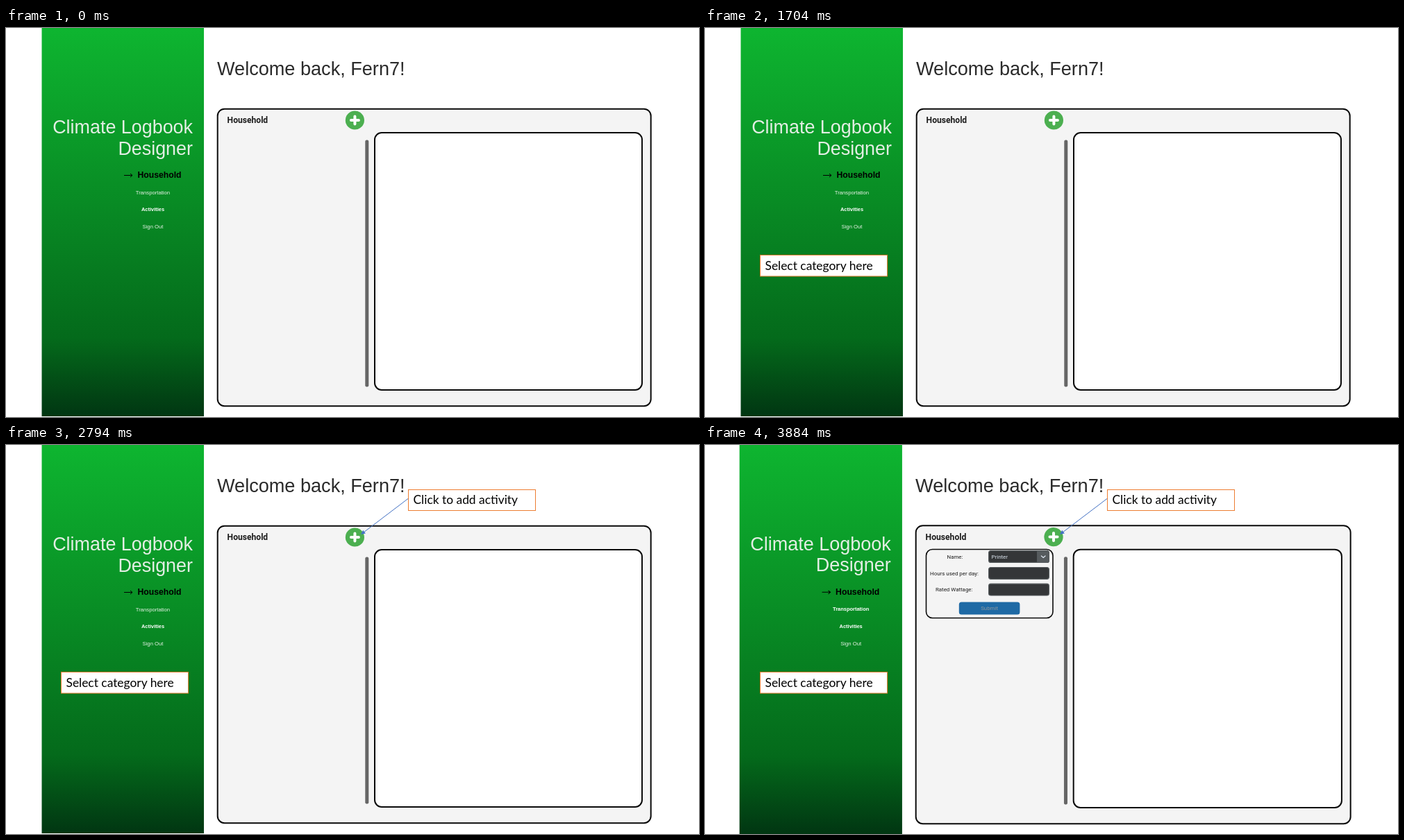
These frames come from a looping animation (998 by 561 pixels, 4.32 s). An HTML page:

```html
<!DOCTYPE html>
<html lang="en">
<head>
<meta charset="utf-8">
<title>Household dashboard</title>
<style>
  html, body { margin: 0; width: 100%; height: 100%; overflow: hidden; background: #fff; }
  svg { display: block; width: 100vw; height: 100vh; }
  text { font-family: "Liberation Sans", Arial, sans-serif; }
  .title { font-size: 26.9px; fill: #e3eee4; text-anchor: end; }
  .menu { font-size: 7.7px; fill: #e6f2e6; text-anchor: middle; }
  .bold { font-size: 7.45px; font-weight: 700; fill: #fff; }
  .note text { font: 17.4px Lato, sans-serif; }
  .note rect { fill: #fff; stroke: #ed7d31; }
  .panel { stroke: #0a0a0a; stroke-width: 2; }
  .form text, .head { font: 7.9px Roboto, sans-serif; fill: #1c1c1c; }
  .head { font-size: 12.1px; font-weight: 700; }
  .mid { text-anchor: middle; }
  .field { fill: #343638; stroke: #565b5e; stroke-width: 1.2; }
</style>
</head>
<body>
<svg viewBox="0 0 998 561" preserveAspectRatio="none">
  <defs>
    <linearGradient id="green" x1="0" y1="0" x2="0" y2="1">
      <stop offset="0" stop-color="#0eb530"/>
      <stop offset=".8" stop-color="#046a1b"/>
      <stop offset="1" stop-color="#013612"/>
    </linearGradient>
  </defs>

  <g id="app">
    <rect x="51.5" width="233.5" y="0" height="560" fill="url(#green)"/>
    <text class="title" x="269" y="152">Climate Logbook</text>
    <text class="title" x="269" y="182.5">Designer</text>
    <path d="M170 212.5h12m-3-2.5 3 2.5-3 2.5" fill="none" stroke="#000"/>
    <text x="189.5" y="216" font-size="12.2" font-weight="700">Household</text>
    <text id="transport" class="menu" x="211.5" y="239.5">Transportation</text>
    <text class="menu bold" x="211.5" y="264">Activities</text>
    <text class="menu" x="211.5" y="289">Sign Out</text>

    <text x="304" y="68.3" font-size="27.1" fill="#2b2b2b">Welcome back, Fern7!</text>
    <rect class="panel" x="304.7" y="116.7" width="624" height="428.5" rx="10" fill="#f4f4f4"/>
    <text class="head" x="318.6" y="137.2">Household</text>
    <circle cx="502.4" cy="133" r="13.6" fill="#4caf50"/>
    <path d="M496.9 133h11m-5.5-5.5v11" stroke="#fff" stroke-width="4" stroke-linecap="round"/>
    <rect x="517.3" y="161.5" width="5" height="356" rx="2.2" fill="#666"/>
    <rect class="panel" x="531" y="151" width="385" height="371" rx="10" fill="#fff"/>
  </g>

  <g id="form" class="form">
    <rect class="panel" x="318.5" y="150.5" width="182.5" height="99" rx="9" fill="#f4f4f4" style="stroke-width:1.6"/>
    <text class="mid" x="360" y="163.7">Name:</text>
    <text class="mid" x="359" y="187.5">Hours used per day:</text>
    <text class="mid" x="358.7" y="211.2">Rated Wattage:</text>
    <rect class="field" x="408.6" y="152.6" width="86.8" height="16.8" rx="3"/>
    <path d="M478 152h14.4q3.6 0 3.6 3.6v10.8q0 3.6-3.6 3.6H478z" fill="#565b5e"/>
    <path d="m484.4 160 2.8 2.4 2.8-2.4" fill="none" stroke="#dce4ee" stroke-width="1.3" stroke-linecap="round"/>
    <text x="412.6" y="163.7" style="fill:#dce4ee">Printer</text>
    <rect class="field" x="408.6" y="176.5" width="86.8" height="16.8" rx="3"/>
    <rect class="field" x="408.6" y="200.2" width="86.8" height="16.8" rx="3"/>
    <rect x="365.8" y="226.5" width="87.6" height="18" rx="3.5" fill="#1f6aa5"/>
    <text class="mid" x="409.6" y="238.3" style="fill:#8f979c">Submit</text>
  </g>

  <g id="select" class="note">
    <rect x="79.5" y="327.5" width="183" height="30.5"/>
    <text x="86.5" y="348.5">Select category here</text>
  </g>

  <g id="add" class="note">
    <path d="M579.5 77 514 126.8" stroke="#4472c4" fill="none"/>
    <path d="m511 129 3.2-6.2 3.6 4.7z" fill="#4472c4"/>
    <rect x="579.5" y="64.5" width="183" height="30"/>
    <text x="586.5" y="85">Click to add activity</text>
  </g>
</svg>
<script>
  const get = id => document.getElementById(id);
  const show = (id, on) => get(id).setAttribute("visibility", on ? "visible" : "hidden");

  function draw() {
    const t = performance.now() % 4320;
    const open = t >= 3230;
    show("select", t >= 1050);
    show("add", t >= 2140);
    show("form", open);
    // the window is a touch larger once the form is open
    get("app").setAttribute("transform", open ? "matrix(1.0032 0 0 1.0035 -2 -.9)" : "");
    get("transport").classList.toggle("bold", open);
    requestAnimationFrame(draw);
  }
  draw();
</script>
</body>
</html>
```
